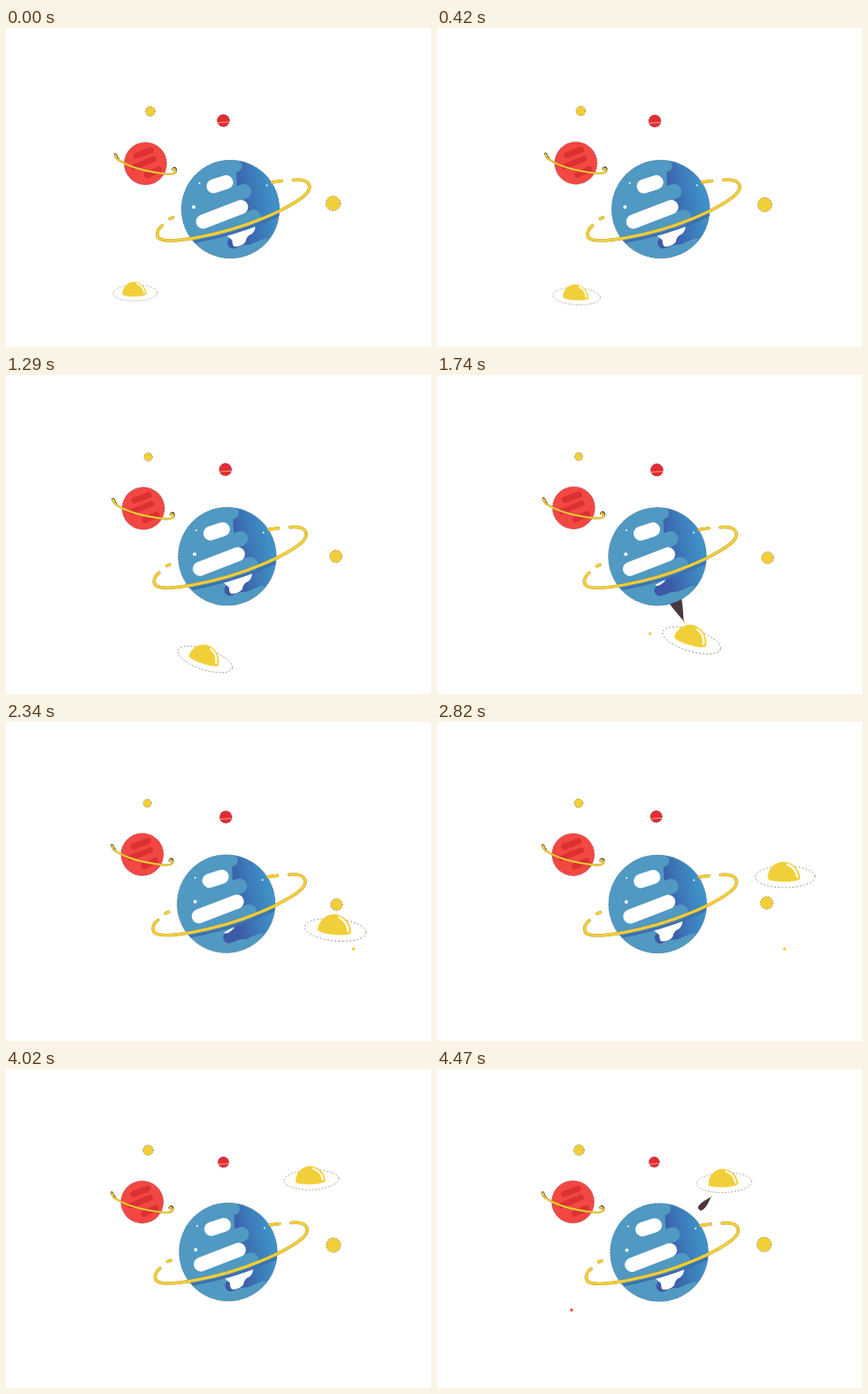
These frames come from a looping animation (480x360 px, 4.5 s). An HTML page with a canvas:

```html
<!DOCTYPE html>
<html lang="en">
<head>
<meta charset="utf-8">
<title>Planets and a flying egg</title>
<style>
  html, body { margin: 0; width: 100%; height: 100%; overflow: hidden; background: #fff; }
  canvas { display: block; width: 480px; height: 360px; }
</style>
</head>
<body>
<canvas id="stage" width="480" height="360"></canvas>
<script>
const LOOP = 4500, STEP = 30;
const GOLD = '#f1cf39', RED = '#f34742', BLUE = '#5099c3', BROWN = '#4b373d';
const ctx = document.getElementById('stage').getContext('2d');

// Key points of the egg's flight: time, x, y.
const FLIGHT = [[0, 146, 299], [780, 171, 307], [1300, 226, 321], [1740, 287.5, 299.5],
  [2700, 396, 190], [3300, 361.5, 125], [4020, 345, 125], [4500, 323, 128.5]];

const SPECKS = [[305, 127, GOLD], [240.5, 292, GOLD], [392.5, 256, GOLD],
  [150.5, 271, RED], [152, 272, RED]];

// Monotone cubic path, so turning points are never overshot.
function along(keys, t, axis) {
  const last = keys.length - 2;
  const slope = i => (keys[i + 1][axis] - keys[i][axis]) / (keys[i + 1][0] - keys[i][0]);
  const tangent = i => {
    const a = slope(Math.max(0, i - 1)), b = slope(Math.min(last, i));
    return a * b > 0 ? 2 * a * b / (a + b) : 0;
  };
  let i = 0;
  while (i < last && t > keys[i + 1][0]) i++;
  const span = keys[i + 1][0] - keys[i][0], u = (t - keys[i][0]) / span, v = 1 - u;
  return keys[i][axis] * v * v * (1 + 2 * u) + keys[i + 1][axis] * u * u * (1 + 2 * v)
    + span * u * v * (tangent(i) * v - tangent(i + 1) * u);
}

// One slow swing out and back per loop, leaning towards the start.
const swing = t => Math.sin(Math.PI * (t / LOOP) ** .85) ** 2;
const sway = (t, start, drift, reach) => start + drift * t / LOOP + reach * swing(t);

function at(x, y, draw, angle = 0) {
  ctx.save();
  ctx.translate(x, y);
  ctx.rotate(angle);
  draw();
  ctx.restore();
}

function disc(x, y, r, fill) {
  ctx.beginPath();
  ctx.arc(x, y, r, 0, Math.PI * 2);
  ctx.fillStyle = fill;
  ctx.fill();
}

function stroke(path, width, color, dash = []) {
  ctx.lineWidth = width;
  ctx.strokeStyle = color;
  ctx.lineCap = ctx.lineJoin = 'round';
  ctx.setLineDash(dash);
  ctx.stroke(path);
  ctx.setLineDash([]);
}

function capsule(x1, y1, x2, y2, width, color) {
  stroke(new Path2D(`M${x1} ${y1}L${x2} ${y2}`), width, color);
}

function ball(r, fill) {
  disc(0, 0, r, fill);
  const edge = new Path2D();
  edge.arc(0, 0, r, 0, Math.PI * 2);
  stroke(edge, .6, 'rgba(30,25,35,.6)', [1, 2.2]);
}

function goldLine(path, width) {
  stroke(path, width + .5, '#b08b2c');
  stroke(path, width, GOLD);
}

const BIG_RING = new Path2D('M-77 18.5C-82 22-84 28-81.5 32C-77 37-60 36-38 32' +
  'C-13 27.5 13 20 36 10.5C62 0 82-12 87-19C92-26 89-35 71-33');
const BIG_GAPS = new Path2D('M47-30.5L58-32M-68.5 10.8L-65 9.3');
const RED_RING = new Path2D('M-33-8.5C-35-12-35-9-31-4.5C-20 3 0 9 22 11.5' +
  'C31 12.5 35 11 34 7.5C33 5.5 31 5.5 31 7');
const RED_RING_ENDS = new Path2D('M-31-5C-35-10-35-12-33-9M31 6.5C33 4 35 6 34 9');
const WIDE_HOLE = new Path2D('M-6 28Q4 26 27 17Q30 22 24 28Q18 30 17 37Q12 43 4 42Q2 40 2 35Z');
const NARROW_HOLE = new Path2D('M-2 32L9 26L6 30Q2 34-2 33Z');

function bigPlanet(t) {
  ball(55.4, BLUE);
  ctx.save();
  disc(0, 0, 55, BLUE);
  ctx.clip();
  const shade = ctx.createLinearGradient(8, 0, 50, -8);
  shade.addColorStop(0, '#3c5aa7');
  shade.addColorStop(.5, '#3c79b8');
  shade.addColorStop(1, '#3f91c8');
  ctx.fillStyle = shade;
  ctx.fill(new Path2D('M6-60L60-60L60 60L42 40L10 40L8 0Z'));
  capsule(-45, -32, 6, -49, 14, BLUE);
  capsule(-45, 1, 15, -20, 17, BLUE);
  capsule(-45, 36, 26, 9, 17, BLUE);
  capsule(3, 38, 30, 28, 13, shade);
  capsule(2, 56, 40, 40, 14, BLUE);
  capsule(-19, -26, -5, -30.5, 16, '#fff');
  capsule(-31, 14, 12, -2.5, 16, '#fff');
  ctx.fillStyle = '#fff';
  ctx.fill(swing(t) > .9 ? NARROW_HOLE : WIDE_HOLE);
  ctx.translate(1, 4);
  stroke(BIG_RING, 3, '#3d70ae');
  ctx.restore();
  disc(sway(t, -41.5, 5, 4), -2.5, 2, '#fff');
  disc(-35, -29.5, 1, '#fff');
  disc(41, -27, 1, '#fff');
  goldLine(BIG_GAPS, 3);
  goldLine(BIG_RING, 3);
}

function redPlanet() {
  ball(24, RED);
  ctx.save();
  ctx.clip();
  const dark = '#dd3033';
  capsule(-10, -9, 6, -15, 7, dark);
  capsule(-13, 4, 9, -5, 6.5, dark);
  capsule(2, 13, 15, 7, 7, dark);
  ctx.restore();
  stroke(RED_RING_ENDS, 2.8, '#2b2429');
  goldLine(RED_RING, 1.7);
}

function redMoon(r) {
  ball(r, '#e22c36');
  capsule(1 - r, 2.4, r - 1, 1.6, 1, '#f3a878');
}

function egg(half, tilt, x, y) {
  at(x, y, () => {
    ctx.scale(half, half);
    const plate = new Path2D();
    plate.ellipse(0, 0, 1, .36, 0, 0, Math.PI * 2);
    ctx.fillStyle = '#fffefa';
    ctx.fill(plate);
    stroke(plate, .02, '#666', [.03, .09]);
    const yolk = new Path2D('M-.58 .06C-.58-.22-.38-.5-.06-.5C.28-.5 .51-.2 .51 .06C.4 .2-.48 .2-.58 .06Z');
    ctx.fillStyle = GOLD;
    ctx.fill(yolk);
    stroke(new Path2D('M.08-.41Q.36-.3 .41 0'), .075, '#fffbe6');
  }, tilt);
}

// A dark plume bursts from the egg towards the big planet at a steady beat.
function plume(t, egg, planet) {
  const beat = 1500, peak = 1740;
  const away = Math.abs(t - peak - beat * Math.round((t - peak) / beat));
  const size = Math.sqrt(Math.max(0, 1 - away / 320));
  if (t < beat / 2 || size === 0) return;
  const length = 52 * size, width = 17 * size;
  const angle = Math.atan2(planet.y - egg.y, planet.x - egg.x);
  at(egg.x, egg.y, () => {
    ctx.translate(21, 0);
    capsule(0, 0, length * .15, 0, 1.2, GOLD);
    ctx.beginPath();
    ctx.moveTo(length * .05, 0);
    for (const side of [-1, 1]) {
      const w = width * side / 2;
      const edge = [[.3, .5], [.55, 1.15], [.84, 1], [.95, .9], [1, .6], [1, 0]]
        .map(([along, across]) => [length * along, w * across]);
      ctx.moveTo(length * .05, 0);
      ctx.bezierCurveTo(...edge[0], ...edge[1], ...edge[2]);
      ctx.bezierCurveTo(...edge[3], ...edge[4], ...edge[5]);
    }
    ctx.fillStyle = BROWN;
    ctx.fill('evenodd');
  }, angle);
}

// Specks light up one after another.
function specks(t) {
  SPECKS.forEach(([x, y, color], i) => {
    if (Math.abs(t - 780 - 900 * i) < 270) disc(x, y, 1.8, color);
  });
}

function render(t) {
  ctx.fillStyle = '#fff';
  ctx.fillRect(0, 0, 480, 360);
  const food = { x: along(FLIGHT, t, 1), y: along(FLIGHT, t, 2) };
  const planet = { x: sway(t, 253.5, -2.5, -3.7), y: 204.5 + 2.5 * (t / LOOP) ** 2 };
  const half = sway(t, 25, 6, 7);
  const tilt = .37 * Math.exp(-(((t - 1450) / 900) ** 2)) - .04;

  plume(t, food, planet);
  at(sway(t, 163, -2.7, -2), sway(t, 94, -2.5, -1), () => ball(sway(t, 5.5, .5, -1.2), GOLD));
  at(sway(t, 245.5, -.2, 3), sway(t, 104.5, .5, 2.6), () => redMoon(sway(t, 7, -1, .5)));
  at(sway(t, 157.5, -4, -1.6), sway(t, 153, -3, -2), redPlanet);
  at(planet.x, planet.y, () => bigPlanet(t));
  egg(half, tilt, food.x, food.y);
  at(sway(t, 369.5, 0, 4), sway(t, 198, 0, 8.5), () => ball(sway(t, 8.3, 0, -1.6), GOLD));
  specks(t);
}

function tick() {
  const t = performance.now() % LOOP;
  render(Math.floor(t / STEP) * STEP);
  requestAnimationFrame(tick);
}
tick();
</script>
</body>
</html>
```
